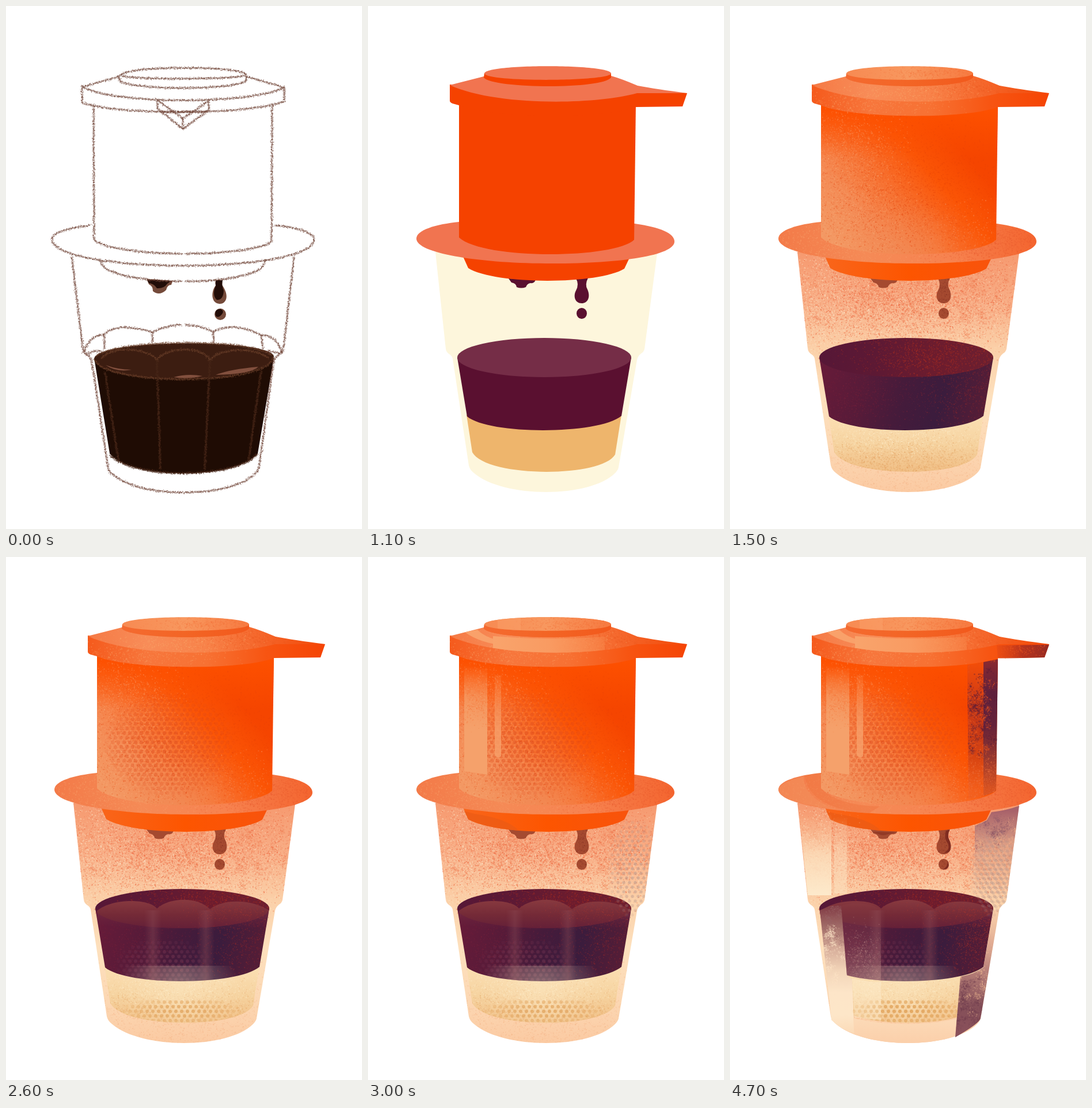
An HTML page with a canvas that plays this animation: 618x906 px, repeating every 5.5 s.

```html
<!DOCTYPE html>
<html lang="en">
<head>
<meta charset="utf-8">
<title>Drip coffee</title>
<style>
  html, body { margin: 0; width: 100%; height: 100%; overflow: hidden; background: #fff; }
  #stage { position: relative; width: 618px; height: 906px; overflow: hidden; }
  #strip { animation: cut 5500ms step-end infinite; }
  canvas { display: block; }
  @keyframes cut {
    0% { transform: translateY(0); }
    9.0909% { transform: translateY(-906px); }
    27.2727% { transform: translateY(-1812px); }
    36.3636% { transform: translateY(-2718px); }
    54.5454% { transform: translateY(-3624px); }
    63.6363%, 100% { transform: translateY(-4530px); }
  }
</style>
</head>
<body>
<div id="stage"><div id="strip"></div></div>
<script>
const W = 618, H = 906;
const strip = document.getElementById('strip');
let ctx, seed = 7;

function random() {
  seed = (seed + 0x6D2B79F5) | 0;
  let t = Math.imul(seed ^ (seed >>> 15), 1 | seed);
  t = (t + Math.imul(t ^ (t >>> 7), 61 | t)) ^ t;
  return ((t ^ (t >>> 14)) >>> 0) / 4294967296;
}
const bell = () => random() + random() + random() - 1.5;

// Starts a new page, optionally on top of a copy of the previous one.
function page(previous) {
  const canvas = document.createElement('canvas');
  canvas.width = W;
  canvas.height = H;
  strip.append(canvas);
  ctx = canvas.getContext('2d');
  ctx.fillStyle = '#fff';
  ctx.fillRect(0, 0, W, H);
  if (previous) ctx.drawImage(previous, 0, 0);
  return canvas;
}

function addStops(gradient, colors) {
  colors.forEach((c, i) => gradient.addColorStop(i / (colors.length - 1), c));
  return gradient;
}
const linear = (x0, y0, x1, y1, ...colors) => addStops(ctx.createLinearGradient(x0, y0, x1, y1), colors);
const radial = (x, y, r, ...colors) => addStops(ctx.createRadialGradient(x, y, 0, x, y, r), colors);

function fill(path, style) {
  ctx.fillStyle = style;
  ctx.fill(typeof path === 'string' ? new Path2D(path) : path);
}

function within(path, draw) {
  ctx.save();
  ctx.clip(path);
  draw();
  ctx.restore();
}

function grains(x, y, rx, ry, count, alpha, size) {
  for (let i = 0; i < count; i++) {
    const s = 0.6 + random() * size;
    ctx.globalAlpha = alpha * (0.3 + 0.7 * random());
    ctx.fillRect(x + bell() * rx, y + bell() * ry, s, s);
  }
}

// Scatters grains in a soft elliptical cloud, kept inside a path.
function spray(path, color, x, y, rx, ry, count, alpha = 0.5, size = 1.5) {
  within(path, () => {
    ctx.fillStyle = color;
    grains(x, y, rx, ry, count, alpha, size);
  });
}

// Scatters small clumps of grains for a worn, patchy surface.
function mottle(path, color, x, y, rx, ry, clumps, alpha = 0.5) {
  within(path, () => {
    ctx.fillStyle = color;
    for (let i = 0; i < clumps; i++) {
      const r = 4 + random() * 8;
      grains(x + bell() * rx, y + bell() * ry, r, r, 35, alpha, 1.8);
    }
  });
}

// Hexagonal dot screen that fades towards its elliptical border.
function dots(path, color, x, y, rx, ry, step, r, alpha) {
  within(path, () => {
    ctx.fillStyle = color;
    let odd = 0;
    for (let v = -ry; v < ry; v += step * 0.8, odd ^= 1) {
      for (let u = -rx + odd * step / 2; u < rx; u += step) {
        ctx.globalAlpha = alpha * Math.max(0, 1 - (u / rx) ** 2 - (v / ry) ** 2) ** 0.6;
        ctx.beginPath();
        ctx.arc(x + u, y + v, r, 0, 7);
        ctx.fill();
      }
    }
  });
}

function chalk(d, color = '#74493c', gap = false, density = 3.2) {
  const line = document.createElementNS('http://www.w3.org/2000/svg', 'path');
  line.setAttribute('d', d);
  const length = line.getTotalLength();
  ctx.fillStyle = color;
  for (let at = 0; at < length; at += 1 / density) {
    const p = line.getPointAtLength(at);
    if (gap && Math.abs(p.x - 308) < 3) continue;
    ctx.globalAlpha = 0.3 + random() * 0.5;
    ctx.fillRect(p.x - 0.6 + bell() * 2.2, p.y - 0.6 + bell() * 2.2, 1.25, 1.25);
  }
  ctx.globalAlpha = 1;
}

const shapes = {
  glass: 'M117 426 L135 594 Q136 600 141 603 Q146 606 147 611 L175 796 Q177 804 184 809 C235 853 385 853 429 809 Q434 804 435 799 L467 613 Q468 607 474 602 Q479 599 480 594 L502 428 Z',
  milk: 'M171 708 L181 773 C205 817 405 818 429 777 L440 708 Z',
  coffee: 'M155 609 L172 711 C210 743 400 743 440 710 L457 609 Z',
  surface: 'M155 609 A151 34 0 0 1 457 609 A151 34 0 0 1 155 609 Z',
  drips: 'M244 472 L291 474 Q289 481 282 480 Q276 481 274 487 Q266 490 258 487 Q257 480 249 479 Z M361 472 L382 471 Q376 483 381 491 C387 505 381 515 371 515 C359 515 356 502 361 493 Q367 482 361 472 Z M371 523 A9 9.5 0 0 1 371 542 A9 9.5 0 0 1 371 523 Z',
  ring: 'M165 434 L174 454 C220 483 400 483 445 455 L455 434 Z',
  brim: 'M84 403 C84 388 118 378 158 374 L463 377 C507 383 532 394 532 408 C532 433 432 447 308 446 C188 445 84 428 84 403 Z',
  body: 'M158 165 L465 165 L462 405 C428 438 200 440 158 401 Z',
  lidSide: 'M142 136 L142 164 Q142 167 147 169 L158 172 C210 195 410 197 465 175 L546 174 L554 151 L467 148 Z',
  lidTop: 'M142 137 L201 122 L422 121 Q440 126 468 138 Q500 144 554 151 L467 151 C390 172 220 173 142 137 Z',
  knobSide: 'M202 116 L201 124 C216 143 405 145 422 124 L422 116 Z',
  knobTop: 'M202 117 C202 100 422 100 422 117 C418 131 206 132 202 117 Z'
};
const P = {};
for (const name in shapes) P[name] = new Path2D(shapes[name]);

function sketch() {
  fill('M153 610 L180 775 C215 821 400 821 437 775 L465 610 Z', '#1f0c04');
  fill('M153 611 C158 576 460 576 465 607 C457 658 160 660 153 611 Z', '#3c1d11');
  const warm = '#6b412c', faint = '#49291b';
  for (const d of [
    'M154 611 C160 658 457 660 464 608',
    'M166 610 C190 585 252 595 262 614 C270 593 340 585 354 614 C368 592 430 590 456 610',
    'M156 607 C190 577 425 575 462 605'
  ]) chalk(d, warm);
  for (const d of [
    'M172 635 L195 787', 'M262 613 L268 803', 'M354 613 L345 803', 'M443 632 L421 787',
    'M181 778 C220 820 400 820 436 776'
  ]) chalk(d, faint, false, 5);
  fill('M173 622 Q194 630 218 630 Q192 635 173 622 Z M291 643 Q316 636 341 641 Q315 647 291 643 Z M364 639 Q390 629 438 625 Q425 638 364 639 Z', '#82503e');

  fill('M244 473 L289 476 L287 483 Q280 483 278 492 Q266 503 255 494 Q255 485 248 482 Z M370 474 Q377 474 375 483 C389 503 382 516 371 516 C355 515 356 494 364 484 Q361 474 370 474 Z M372 524 A10 10 0 0 1 372 544 A10 10 0 0 1 372 524 Z', '#744a3a');
  fill('M245 474 L287 476 L280 481 Q274 490 262 489 Q257 481 248 480 Z M364 475 L376 475 Q374 484 378 493 Q377 510 366 509 Q357 501 364 485 Z M372 525 Q381 528 373 536 Q368 541 364 537 Q361 525 372 525 Z', '#220d08');

  for (const d of [
    'M153 405 C190 437 425 436 461 408',
    'M164 440 Q166 453 176 456 C225 484 395 484 440 456 Q448 452 449 440',
    'M134 600 Q145 571 170 569 Q193 547 254 565 Q308 540 360 564 Q395 546 443 570 Q472 571 479 602'
  ]) chalk(d, undefined, true);
  for (const d of [
    'M200 120 C203 103 413 103 416 119 C413 128 204 128 200 120',
    'M197 120 L197 130 C225 146 390 146 417 130 L417 120',
    'M197 122 L132 140 C190 171 425 171 483 141 L417 122',
    'M132 140 L132 167 C190 190 425 189 483 165 L483 141',
    'M152 172 L153 405', 'M462 172 L461 408',
    'M146 380 C105 385 80 393 80 404 C82 465 533 465 535 404 C533 392 508 384 467 380',
    'M114 434 L133 590 Q135 602 143 605 Q149 612 150 624 L177 799 Q177 806 186 812 C235 853 385 853 430 812 Q438 807 439 799 L464 622 Q465 609 473 604 Q481 600 482 590 L500 434',
    'M170 569 L171 594', 'M254 565 L254 583', 'M360 564 L360 583', 'M443 570 L446 593',
    'M140 603 Q155 596 166 598', 'M452 598 Q464 597 476 603',
    'M263 162 L263 178 L307 213 L352 180 L352 163', 'M264 164 L307 195 L351 165',
    'M307 195 L307 213', 'M270 183 L345 183'
  ]) chalk(d);
}

function flat() {
  const main = '#f54200', light = '#f17450', wine = '#5a1030';
  const colors = {
    glass: '#fdf6dc', milk: '#eeb56c', coffee: wine, surface: '#752d47', drips: wine,
    ring: main, brim: light, body: main, lidSide: main, lidTop: light, knobSide: main, knobTop: light
  };
  for (const name in P) fill(P[name], colors[name]);
}

function shaded() {
  fill(P.glass, linear(0, 430, 0, 842, '#f69a70', '#f8ae86', '#fbd0a8', '#fde0bd', '#fcd9b5', '#fbcaa2'));
  spray(P.glass, '#ea5a32', 310, 515, 230, 75, 7500, 0.5);
  spray(P.glass, '#fde5c9', 300, 540, 240, 90, 4500, 0.5);
  mottle(P.glass, '#ee7a50', 310, 510, 220, 55, 60, 0.35);
  spray(P.glass, '#fce3c4', 155, 520, 60, 130, 1800, 0.5);
  spray(P.glass, '#f0a878', 300, 790, 230, 90, 3500, 0.35);

  fill(P.milk, linear(0, 710, 0, 806, '#fbdfb3', '#f6d3a0', '#f1c087'));
  spray(P.milk, '#dd9450', 300, 790, 190, 45, 3500, 0.35);
  spray(P.milk, '#fdecc9', 290, 745, 150, 35, 1800, 0.5);

  fill(P.coffee, linear(165, 640, 430, 715, '#651b39', '#571b39', '#451b3b', '#3b1c3d', '#531d37'));
  spray(P.coffee, '#aa2f2c', 420, 660, 90, 65, 1500, 0.35);
  spray(P.coffee, '#84283f', 230, 675, 100, 60, 1700, 0.3);
  fill(P.surface, linear(155, 590, 457, 625, '#561737', '#5d1934', '#6c1c2e', '#6b1f30'));
  spray(P.surface, '#bb3420', 360, 605, 140, 40, 2000, 0.45);

  fill(P.drips, '#a54a30');
  spray(P.drips, '#7e2d22', 370, 510, 25, 45, 350, 0.4);
  fill(P.ring, linear(167, 0, 455, 0, '#f9651a', '#fd5500', '#f8530c'));

  fill(P.brim, linear(84, 0, 532, 0, '#f37a48', '#f58a56', '#f78350', '#f4652f'));
  spray(P.brim, '#e5562c', 430, 405, 120, 40, 2200, 0.4);
  spray(P.brim, '#f8a26d', 200, 410, 160, 40, 1800, 0.45);

  fill(P.body, linear(175, 400, 375, 220, '#f39863', '#f48a54', '#f7702f', '#fb5506', '#f54500'));
  fill(P.body, linear(0, 180, 0, 265, '#fd5000', '#fd500000'));
  fill(P.body, radial(300, 430, 100, '#f08a5599', '#f08a5500'));
  spray(P.body, '#f6a875', 180, 370, 110, 120, 3800, 0.5);
  spray(P.body, '#f99560', 200, 260, 90, 80, 2300, 0.5);
  spray(P.body, '#e3440c', 300, 330, 170, 120, 4800, 0.4);
  spray(P.body, '#f78a55', 350, 400, 130, 60, 1800, 0.5);

  fill(P.lidSide, linear(142, 0, 554, 0, '#f55a1c', '#f7763c', '#f77133', '#f75512', '#f54404'));
  spray(P.lidSide, '#f9a066', 240, 168, 130, 22, 800, 0.45);
  fill(P.lidTop, linear(142, 0, 554, 0, '#f57a45', '#f88c58', '#f88249', '#f56428', '#f24806'));
  spray(P.lidTop, '#f9a86c', 300, 150, 130, 20, 700, 0.5);
  spray(P.lidTop, '#e85a20', 420, 142, 80, 22, 650, 0.4);
  fill(P.knobSide, linear(201, 0, 422, 0, '#f46a30', '#f36525', '#f2591c'));
  fill(P.knobTop, linear(201, 0, 422, 0, '#f78a52', '#f8985f', '#f77a40'));
  spray(P.knobTop, '#f26d36', 350, 115, 90, 12, 500, 0.4);
}

function patterned() {
  dots(P.body, '#dc4a1c', 285, 325, 115, 92, 10, 3.2, 0.45);
  const arches = new Path2D('M158 613 C185 590 250 592 262 609 C285 588 335 589 354 610 C380 590 430 594 456 612 L456 640 C390 648 220 648 160 636 Z');
  within(P.coffee, () => fill(arches, linear(0, 597, 0, 650, '#85394a', '#70283f88', '#5a1a3800')));
  within(P.surface, () => fill(arches, linear(0, 595, 0, 645, '#87393f', '#742a37', '#631f38')));
  spray(arches, '#a83b35', 390, 615, 90, 25, 700, 0.35);
  for (const [x, tilt] of [[262, 2], [354, -2]]) {
    within(P.coffee, () => {
      fill(`M${x - 22} 612 H${x + 8} L${x + 8 + tilt} 740 H${x - 22} Z`,
        linear(x - 22, 0, x + 8, 0, '#8b4a5500', '#8b4a5566', '#8b4a5500'));
    });
  }
  dots(P.coffee, '#85405a', 275, 708, 85, 48, 10, 3, 0.38);
  fill(P.milk, radial(300, 765, 110, '#fdebc877', '#fdebc800'));
  dots(P.milk, '#e0a057', 305, 787, 105, 24, 10, 3, 0.7);
}

function highlighted() {
  fill('M167 188 L207 194 L207 377 L167 371 Z', linear(0, 188, 0, 300, '#f5a16b00', '#f5a16baa', '#f5a16b'));
  fill('M220 203 L231 206 L231 345 Q226 350 220 344 Z', linear(0, 203, 0, 300, '#f7a06a22', '#f7a06acc'));
  spray(P.body, '#f76a2b', 190, 250, 35, 40, 450, 0.4);
  within(P.lidTop, () => {
    fill('M168 130 L190 126 Q205 142 245 148 L243 154 Q195 150 168 130 Z', '#f9a16a');
    fill('M217 137 Q310 145 411 138 L411 163 Q310 170 217 161 Z', linear(217, 0, 411, 0, '#f9a46c', '#f99b62', '#f88d5066'));
  });
  // The knob stands in front of the lid highlight.
  fill(P.knobSide, linear(201, 0, 422, 0, '#f46a30', '#f36525', '#f2591c'));
  fill(P.knobTop, linear(201, 0, 422, 0, '#f78a52', '#f8985f', '#f77a40'));
  spray(P.knobTop, '#f26d36', 350, 115, 90, 12, 500, 0.4);
  within(P.knobTop, () => fill('M225 104 H265 V130 H225 Z', '#f9a26b66'));
  fill('M167 440 L185 445 Q240 452 262 474 Q205 469 174 455 Z', '#ea5a16aa');
  dots(P.glass, '#b39288', 462, 540, 48, 88, 10, 2.7, 0.5);
}

function shadowed() {
  const bodyShade = new Path2D('M412 187 L440 182 L465 177 L462 405 Q448 414 414 419 Z');
  within(bodyShade, () => {
    fill('M412 180 H440 V420 H412 Z', linear(0, 185, 0, 405, '#ee4c0cbb', '#c93a1bbb', '#b3331fbb', '#c83f18aa', '#e9602a66'));
    fill('M440 175 H466 V420 H440 Z', linear(0, 178, 0, 405, '#8a2a30', '#5f203c', '#65223a', '#96372e', '#c9502baa'));
  });
  mottle(bodyShade, '#5c1f3a', 432, 275, 30, 65, 38, 0.55);
  mottle(bodyShade, '#e8561f', 428, 250, 30, 90, 34, 0.5);
  spray(bodyShade, '#ef7440', 435, 380, 55, 50, 900, 0.5);

  const handle = new Path2D('M463 153 L554 152 L546 174 L465 176 Z');
  fill(handle, linear(463, 0, 554, 0, '#d8421755', '#b5331e', '#962a22'));
  spray(handle, '#e85522', 500, 160, 50, 18, 320, 0.6);

  within(P.brim, () => {
    fill('M84 403 Q85 390 128 380 Q127 418 188 438 Q85 425 84 403 Z', '#f4905c99');
    fill('M130 378 L158 374 L158 401 Q188 431 260 432 L240 445 Q135 434 130 378 Z', '#ed733c77');
  });

  const sideShade = new Path2D('M425 466 L446 456 L454 442 Q480 439 502 431 L480 594 L474 602 L425 582 Z');
  fill(sideShade, linear(0, 440, 0, 585, '#a8626a', '#ba7f7acc', '#d3a08d77', '#d8a89133', '#d8a89100'));
  mottle(sideShade, '#f5b48c', 465, 520, 50, 55, 45, 0.45);
  mottle(sideShade, '#8f5a69', 450, 470, 45, 30, 25, 0.4);
  dots(P.glass, '#a98f89', 462, 545, 45, 75, 10, 2.7, 0.4);

  within(P.glass, () => {
    fill('M120 445 H176 V586 H135 Z', linear(0, 445, 0, 585, '#fbd3ac00', '#fce0bdcc', '#fde9cb'));
    fill('M181 450 H203 V583 H181 Z', linear(0, 450, 0, 583, '#fce0bd00', '#fce0bd88', '#fce0bd99'));
  });
  spray(P.glass, '#f4a477', 155, 475, 50, 35, 600, 0.4);

  const facet = new Path2D('M156 612 Q175 602 193 604 L203 725 L212 731 L216 826 Q192 818 176 802 Z');
  fill(facet, linear(0, 600, 0, 832, '#7d3440', '#a06a66', '#d5ab98', '#f2d4b8', '#fde5c8', '#fde6c8', '#fbd8b4'));
  mottle(facet, '#9a6567', 182, 645, 28, 35, 24, 0.4);
  mottle(facet, '#fce3c6', 170, 690, 20, 50, 24, 0.5);

  const pane = new Path2D('M193 604 Q230 593 262 610 L262 733 Q230 732 203 725 Z');
  fill(pane, linear(0, 605, 0, 735, '#a5605a11', '#a96c7044', '#b98b8688'));
  spray(pane, '#c79a90', 230, 700, 40, 55, 800, 0.35);
  fill('M212 730 Q238 736 262 736 L262 802 Q235 801 216 797 Z', '#fdecce77');
  within(P.glass, () => fill('M214 799 C270 812 345 812 393 800 L391 836 L309 850 L216 833 Z', linear(0, 799, 0, 842, '#fcdab7', '#fbcfaa')));
  dots(P.milk, '#dfa052', 305, 787, 95, 24, 10, 3, 0.3);

  const corner = new Path2D('M400 727 Q426 722 440 711 L457 611 L467 613 L435 799 Q433 808 391 832 Z');
  fill(corner, linear(0, 612, 0, 832, '#e6ae9133', '#d49480aa', '#a66b6cdd', '#855059', '#8a505a'));
  mottle(corner, '#f2bd95', 432, 730, 45, 60, 32, 0.45);
  mottle(corner, '#6d3b4e', 412, 775, 35, 50, 34, 0.4);
  spray(P.coffee, '#b3392d', 435, 655, 45, 65, 850, 0.4);

  within(P.drips, () => {
    fill('M375 474 Q371 486 378 496 Q383 507 371 513 Q388 513 384 496 L384 472 Z M376 524 Q381 534 370 541 L382 540 Z', '#7f2c20');
    fill('M246 476 L289 477 L275 480 Q265 484 258 480 Z', '#86301f99');
  });
}

page();
sketch();
let last = page();
flat();
last = page();
shaded();
for (const step of [patterned, highlighted, shadowed]) {
  last = page(last);
  step();
}
</script>
</body>
</html>
```
